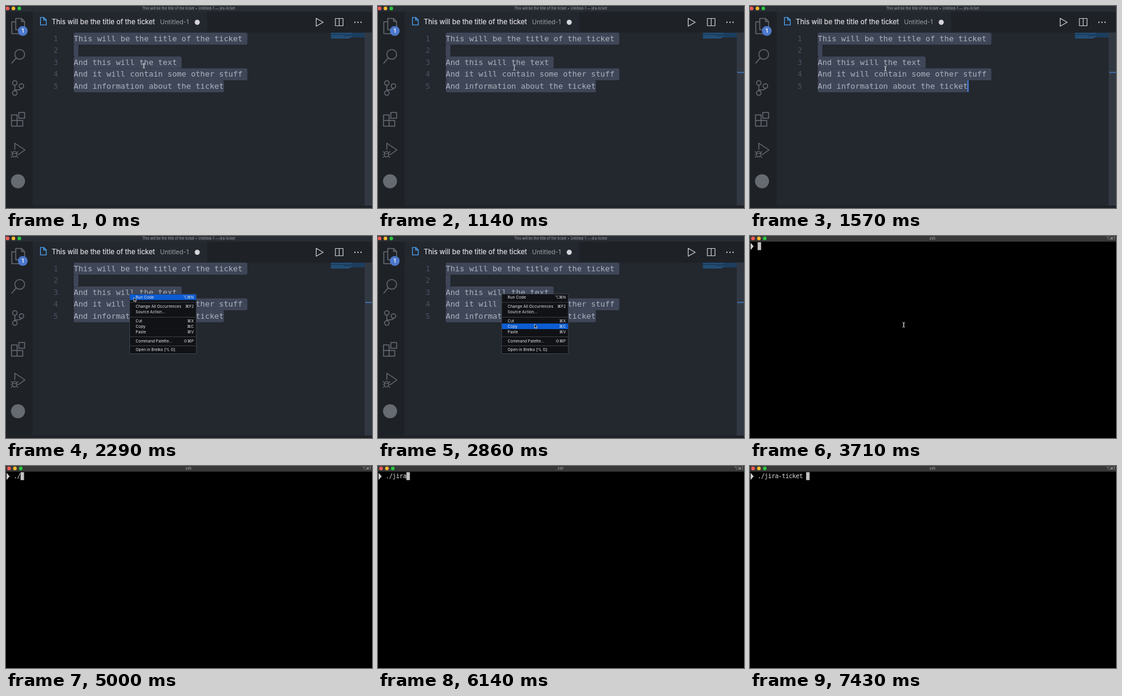
An HTML page for the animation above (8 s loop, 600 px wide and 332 px high).

```html
<!DOCTYPE html>
<html lang="en">
<head>
<meta charset="utf-8">
<title>Ticket from selection</title>
<style>
  html, body { margin: 0; width: 100%; height: 100%; overflow: hidden; background: #000; }
  svg { display: block; width: 100vw; height: 100vh; }
  text { font-family: Inter, "DejaVu Sans", sans-serif; white-space: pre; }
  .code text { font: 12.78px "DejaVu Sans Mono", monospace; fill: #abb2bf; }
  .code .num { fill: #495162; text-anchor: end; }
  .bar { font-size: 5.72px; text-anchor: middle; }
  .menu text { font-size: 6.5px; fill: #e6e6e6; }
  .menu .key { text-anchor: end; }
  .icons { fill: none; stroke: #666a71; stroke-width: 1.5; stroke-linejoin: round; }
  .tools { fill: none; stroke: #c6c9cf; stroke-width: 1.2; stroke-linejoin: round; }
  #typed { font: 10px "DejaVu Sans Mono", monospace; letter-spacing: -.34px; fill: #dedede; }
</style>
</head>
<body>
<svg viewBox="0 0 600 332" preserveAspectRatio="none">
  <g id="editor">
    <rect width="600" height="332" fill="#23272e"/>
    <rect width="600" height="9.5" fill="#282c33"/>
    <rect y="9.5" width="43.5" height="323" fill="#1e2227"/>
    <rect x="330" y="9.5" width="270" height="34" fill="#1e2227"/>
    <rect y="328" width="600" height="4" fill="#1e2227"/>
    <text class="bar" x="299.5" y="6" fill="#a4a8ae">This will be the title of the ticket • Untitled-1 — jira-ticket</text>

    <g class="icons">
      <path d="M16 20.500h9.500l5 5v13.500h-14.500z M25.500 20.500v5h5 M16 26h-6.500v19.500h14v-6.500"/>
      <circle cx="22.500" cy="79.500" r="8"/>
      <path d="M16.800 85.300L9 94.500"/>
      <circle cx="14.500" cy="126.500" r="3.700"/>
      <circle cx="14.500" cy="143" r="3.700"/>
      <circle cx="25.300" cy="131.500" r="3.700"/>
      <path d="M14.500 130.200v9 M25.300 135.200c0 4-10.800 1.500-10.800 4"/>
      <path d="M9 179h9.200v18.500h-9.200z M9 188.200h18.500v9.300h-9.300v-9.300 M21 175h9.500v9.500h-9.500z"/>
      <path d="M14.500 236v-10.500l16.500 11-11 8"/>
      <path d="M10.500 243.500a3.500 4.700 0 1 0 7 0a3.500 4.700 0 1 0-7 0z M10.500 242.500h7 M8 239l2.500 2 M20 239l-2.500 2 M7.500 244h3 M17.500 244h3 M8.200 249l2.700-2.200 M19.800 249l-2.700-2.200" stroke-width="1.200"/>
    </g>
    <circle cx="19.700" cy="288" r="11.500" fill="#666a71"/>
    <circle cx="27.500" cy="41" r="8" fill="#4d78cc"/>
    <text x="27.500" y="44.200" font-size="9" font-weight="600" fill="#fff" text-anchor="middle">1</text>

    <path d="M56.500 18.800h5.500l4 4v8.400h-9.500z M61.700 18.800v4.200h4.300" fill="none" stroke="#4aa0ee" stroke-width="1.300"/>
    <text x="75" y="30.300" font-size="11.300" fill="#e4e5e8" stroke="#e4e5e8" stroke-width=".15">This will be the title of the ticket</text>
    <text x="252.500" y="30.300" font-size="10.400" fill="#9b9fa6">Untitled-1</text>
    <circle cx="313.500" cy="26.700" r="4.200" fill="#d3d5d9"/>
    <g class="tools">
      <path d="M508.500 20.200l11.500 6.500-11.500 6.500z M540 20.500h12.500v12h-12.500z M546.250 20.500v12"/>
      <path d="M571 26.800h2 M576 26.800h2 M581 26.800h2" stroke-width="2"/>
    </g>

    <g class="code" id="code"></g>
    <g id="minimap"></g>
    <rect x="588" y="43.500" width="12" height="284.500" fill="#323842"/>
    <rect id="tick" x="589" y="108.300" width="11" height="1.800" fill="#3f70ae"/>
    <rect id="caret" x="356.500" y="122.200" width="1.800" height="19.200" fill="#4d8cf0"/>

    <g class="menu" id="menu">
      <rect x="202.700" y="95.200" width="109.300" height="98.300" rx="1.500" fill="#101216" stroke="#4b4f56" stroke-width=".8"/>
      <rect id="pick" x="203.100" width="108.500" height="9.200" fill="#0c5cd2"/>
    </g>
  </g>

  <g id="terminal">
    <rect width="600" height="332"/>
    <rect width="600" height="9.300" fill="#383838"/>
    <text class="bar" x="299" y="6.200" font-size="6" fill="#b9b9b9">zsh</text>
    <text x="598.500" y="6.200" font-size="6" fill="#b0b0b0" text-anchor="end">⌥⌘1</text>
    <path d="M1 11v12l5-6z" fill="#cfcfcf"/>
    <text id="typed" x="12.500" y="20.200"></text>
    <rect id="block" y="10.200" width="5.700" height="13" fill="#c1c1c1"/>
  </g>

  <g id="lights"></g>
  <g id="beam" fill="none" stroke-linecap="round">
    <path d="M-1.700-4q1.700 0 1.700 1v6q0 1-1.700 1 M1.700-4q-1.700 0-1.700 1v6q0 1 1.700 1" stroke="#d5d7da" stroke-width=".9"/>
  </g>
  <path id="arrow" d="M0 0v6.300l1.500-1.400 1.100 2.500 1.200-.5-1.100-2.500h2z" fill="#000" stroke="#eee" stroke-width=".7"/>
</svg>
<script>
const $ = id => document.getElementById(id);
const NS = 'http://www.w3.org/2000/svg';
function add(parent, tag, attrs, text) {
  const el = document.createElementNS(NS, tag);
  for (const name in attrs) el.setAttribute(name, attrs[name]);
  if (text) el.textContent = text;
  return parent.appendChild(el);
}
const show = (id, on) => $(id).setAttribute('display', on ? 'inline' : 'none');

const LOOP = 8000, STEP = 1000 / 7;
const CHAR = 7.694, LINE = 19.55, CELL = 5.68;
const COMMAND = './jira-ticket ';

// Editor lines, selection and minimap
const lines = [
  'This will be the title of the ticket', '', 'And this will the text',
  'And it will contain some other stuff', 'And information about the ticket'
];
lines.forEach((line, i) => {
  const last = i === lines.length - 1;
  add($('code'), 'rect', {
    x: 111, y: 43.8 + i * LINE, height: LINE + .1, rx: 2.5,
    width: (line.length + (last ? 0 : 1)) * CHAR, fill: '#3f4657'
  });
  add($('minimap'), 'rect', {
    x: 532.5, y: 44 + i * 1.9, height: 1.9, width: last ? 31 : 55.5, fill: '#1c4063'
  });
  add($('minimap'), 'rect', {
    x: 533, y: 44.4 + i * 1.9, height: 1, width: line.length * .95, fill: '#2a608f'
  });
});
lines.forEach((line, i) => {
  const y = 57.8 + i * LINE;
  add($('code'), 'text', { x: 85.5, y, class: 'num' }, String(i + 1));
  add($('code'), 'text', { x: 111, y }, line);
});

// Context menu: baseline, label, shortcut
const items = [
  [103.3, 'Run Code', '⌥⌘N'],
  [118.3, 'Change All Occurrences', '⌘F2'],
  [127.3, 'Source Action...'],
  [142.3, 'Cut', '⌘X'],
  [151.1, 'Copy', '⌘C'],
  [160, 'Paste', '⌘V'],
  [174.7, 'Command Palette...', '⇧⌘P'],
  [189.2, 'Open in Brelko [^L G]']
];
for (const [y, label, key] of items) {
  add($('menu'), 'text', { x: 212.5, y }, label);
  if (key) add($('menu'), 'text', { x: 308, y, class: 'key' }, key);
}
for (const y of [108.6, 133, 165.3, 180])
  add($('menu'), 'rect', { x: 203.1, y, width: 108.5, height: .8, fill: '#44484f' });

const lights = ['#fc5b57', '#fdbc2e', '#28c840'].map((fill, i) =>
  add($('lights'), 'circle', { cy: 3.9, r: 3, fill }));

// Pointer stops: step, x, y
const path = [
  [0, 226, 98], [1, 226, 98], [5, 224, 101], [7, 224, 101], [10, 222, 103],
  [11, 222, 103], [13, 203, 95], [15, 204, 96], [20, 256.5, 145],
  [23, 252, 146], [26, 252, 146], [30, 227, 146]
];
function pointer(step) {
  const i = path.findIndex(p => p[0] > step);
  if (i < 0) return path[path.length - 1].slice(1);
  const [s0, x0, y0] = path[i - 1], [s1, x1, y1] = path[i];
  const u = (step - s0) / (s1 - s0), e = u * u * (3 - 2 * u);
  return [x0 + (x1 - x0) * e, y0 + (y1 - y0) * e];
}

// Steps at which each key lands; the last one is tab completion
const keys = [34, 35, 38, 39, 41, 42, 48, 49, 52];
function typedCount(step) {
  const n = keys.filter(k => k <= step).length;
  return n === keys.length ? COMMAND.length : n;
}

function draw(ms) {
  const step = Math.floor(ms / STEP + .05);
  const inTerminal = step >= 26, menuOpen = step >= 13 && step < 23;
  const [x, y] = pointer(step);

  show('editor', !inTerminal);
  show('terminal', inTerminal);
  lights.forEach((dot, i) => dot.setAttribute('cx', (inTerminal ? 5 : 2.6) + i * 9.6));

  show('menu', menuOpen);
  show('tick', step >= 8);
  show('caret', (step >= 3 && step < 7) || (step >= 10 && step < 13) || step >= 23);
  const hit = items.find(([base]) => y >= base - 7.3 && y < base + 1.9);
  show('pick', menuOpen && step > 14 && hit);
  if (hit) $('pick').setAttribute('y', hit[0] - 7.3);

  const n = typedCount(step);
  $('typed').textContent = COMMAND.slice(0, n);
  $('block').setAttribute('x', 12.5 + n * CELL);

  show('beam', !menuOpen && step < keys[0]);
  show('arrow', menuOpen);
  for (const id of ['beam', 'arrow']) $(id).setAttribute('transform', `translate(${x} ${y})`);
}

const start = performance.now();
function tick() {
  draw((performance.now() - start) % LOOP);
  requestAnimationFrame(tick);
}
tick();
</script>
</body>
</html>
```
